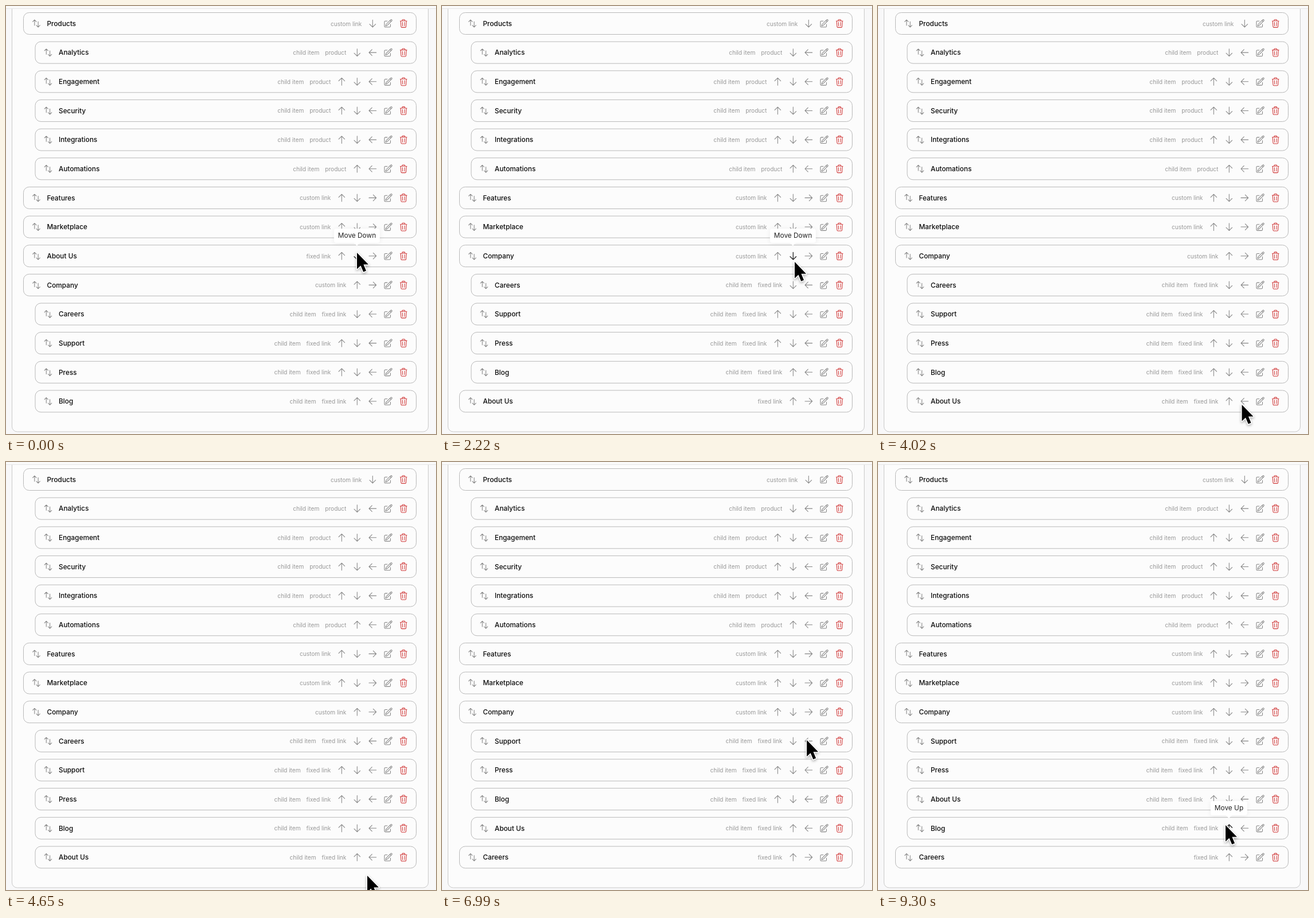
Animation of 751 by 746 pixels, one loop 9420 ms. Source, as an HTML page:

```html
<!DOCTYPE html>
<html lang="en">
<head>
<meta charset="utf-8">
<title>Menu editor</title>
<style>
  html, body { margin: 0; width: 100%; height: 100%; overflow: hidden; background: #f8f8f9; }
  body { position: relative; font-family: Inter, sans-serif; }
  svg { position: absolute; left: 0; top: 0; overflow: visible; }
  .row { fill: #fcfcfc; stroke: #b9b9b9; }
  .name { font-size: 11.85px; font-weight: 500; fill: #0c0c0c; }
  .meta { font-size: 10.12px; fill: #989898; text-anchor: end; }
  .icon { fill: none; stroke: #858585; stroke-width: 1.5; stroke-linecap: round; stroke-linejoin: round; }
  .icon.hot { stroke: #2a2a2a; stroke-width: 1.9; }
  .icon.trash { stroke: #d03a3a; }
  #tip {
    position: absolute; height: 25px; padding: 0 7px; border-radius: 4px; background: #fff;
    font-size: 11.85px; line-height: 25px; color: #222; white-space: nowrap;
    transform: translateX(-50%); box-shadow: 0 1px 9px rgba(0, 0, 0, .07);
  }
  #tip::after {
    content: ""; position: absolute; left: 50%; top: 100%; margin-left: -5px;
    border: 5px solid transparent; border-top-color: #fff; border-bottom: 0;
  }
  #cursor { filter: drop-shadow(0 2px 2px rgba(0, 0, 0, .3)); }
</style>
</head>
<body>
<svg width="751" height="746">
  <rect x="10.5" y="-20" width="727" height="762" rx="9" fill="#fcfcfc" stroke="#c9c9c9"/>
  <rect width="751" height="4" fill="#fafafa"/>
  <path d="M0 4.5H751" stroke="#e6e6e6"/>
  <g id="list"></g>
</svg>
<div id="tip"></div>
<svg id="cursor" width="24" height="40">
  <path d="M0 0V28.5L6.5 22.4 11.2 33.6 16 31.6 11.4 20.6H20Z" fill="#000" stroke="#fff"
    stroke-width="3" stroke-linejoin="round" paint-order="stroke"/>
</svg>
<script>
const LOOP = 9420, TOP = 30.5, STEP = 50.65, GAP = 27;

const kinds = {
  Products: 'custom link', Features: 'custom link', Marketplace: 'custom link', Company: 'custom link',
  Analytics: 'product', Engagement: 'product', Security: 'product', Integrations: 'product', Automations: 'product'
};
const head = 'Products,>Analytics,>Engagement,>Security,>Integrations,>Automations,Features,Marketplace,';

// [start, rows after the fixed head]; ">" marks a child
const orders = [
  [0, 'About Us,Company,>Careers,>Support,>Press,>Blog'],
  [1590, 'Company,>Careers,>Support,>Press,>Blog,About Us'],
  [3600, 'Company,>Careers,>Support,>Press,>Blog,>About Us'],
  [6630, 'Company,>Support,>Press,>Blog,>About Us,Careers'],
  [8640, 'Company,>Support,>Press,>About Us,>Blog,Careers']
];

// [from, to, row, x, tooltip]
const hovers = [
  [0, 2280, 8, 613, 'Move Down'],
  [3380, 3780, 13, 640, ''],
  [5560, 5900, 10, 613, 'Move Down'],
  [6080, 6990, 9, 640, ''],
  [8340, LOOP, 12, 613, 'Move Up']
];

// [time, x, y]
const path = [
  [0, 613, 430], [1590, 613, 430], [2220, 616, 446], [2490, 628, 711], [2730, 628, 711],
  [3210, 630, 701], [3450, 637, 688], [3720, 637, 688], [4650, 631, 721], [4740, 631, 722],
  [4950, 631, 722], [5600, 614, 538], [5850, 634, 511], [6300, 638, 484], [6900, 638, 484],
  [7890, 601, 543], [8430, 607, 633], [LOOP, 607, 633]
];

const arrow = 'M4.5 10.5 12 3l7.5 7.5M12 3v18';
const shapes = {
  sort: 'M3 7.5 7.5 3 12 7.5M7.5 3v13.5M21 16.5 16.5 21 12 16.5M16.5 21V7.5',
  edit: 'm16.86 4.49 1.69-1.69a1.875 1.875 0 1 1 2.65 2.65L10.58 16.07a4.5 4.5 0 0 1-1.9 1.13L6 18' +
    'l.8-2.69a4.5 4.5 0 0 1 1.13-1.89ZL19.5 7.13M18 14v4.75A2.25 2.25 0 0 1 15.75 21H5.25' +
    'A2.25 2.25 0 0 1 3 18.75V8.25A2.25 2.25 0 0 1 5.25 6H10',
  trash: 'M3.75 5.9Q12 4.6 20.25 5.9M4.8 5.8 5.84 19.7a2.25 2.25 0 0 0 2.24 2.05h7.84' +
    'a2.25 2.25 0 0 0 2.24-2.05L19.2 5.8M8.25 5.4v-.9a2.2 2.2 0 0 1 2.1-2.2h3.3' +
    'a2.2 2.2 0 0 1 2.1 2.2v.9M9.26 9l.35 9M14.74 9l-.35 9'
};
const turns = { up: 0, right: 90, down: 180, left: 270 };

const list = document.getElementById('list');
const tip = document.getElementById('tip');
const cursor = document.getElementById('cursor');

function icon(kind, x, y, hot) {
  const cls = `icon ${kind}${hot ? ' hot' : ''}`;
  return `<path class="${cls}" d="${shapes[kind] || arrow}" transform="translate(${x} ${y})
    scale(.703) rotate(${turns[kind] || 0}) translate(-12 -12)"/>`;
}

function drawRow(rows, i, hover) {
  const child = rows[i][0] === '>';
  const name = rows[i].replace('>', '');
  const kind = kinds[name] || 'fixed link';
  const isTop = r => r[0] !== '>';
  const first = child ? isTop(rows[i - 1]) : !rows.slice(0, i).some(isTop);
  const last = child ? !rows[i + 1] || isTop(rows[i + 1]) : !rows.slice(i + 1).some(isTop);

  const tools = [];
  if (!first) tools.push('up');
  if (!last) tools.push('down');
  if (child) tools.push('left');
  else if (!first) tools.push('right');
  tools.push('edit', 'trash');

  const y = TOP + i * STEP, left = child ? 51 : 30.5;
  const start = 694.3 - (tools.length - 1) * GAP;
  const icons = tools.map((tool, n) => {
    const x = start + n * GAP;
    return icon(tool, x, y, hover && hover[2] === i && Math.abs(hover[3] - x) < 5);
  });
  const meta = child ? `child item<tspan dx="10">${kind}</tspan>` : kind;
  return `<rect class="row" x="${left}" y="${y - 19}" width="${716.5 - left}" height="38" rx="10"/>
    ${icon('sort', left + 22.5, y)}
    <text class="name" x="${left + 41}" y="${y + 4.2}">${name}</text>
    <text class="meta" x="${start - 18.9}" y="${y + 4}">${meta}</text>${icons.join('')}`;
}

// Tangent of a monotone curve through the path points
function slope(i, k) {
  if (!path[i - 1] || !path[i + 1]) return 0;
  const rate = n => (path[n + 1][k] - path[n][k]) / (path[n + 1][0] - path[n][0]);
  const a = rate(i - 1), b = rate(i);
  return a * b > 0 ? 2 * a * b / (a + b) : 0;
}

function cursorAt(t) {
  const i = path.findIndex((p, n) => t < path[n + 1][0]);
  const a = path[i], b = path[i + 1], span = b[0] - a[0], u = (t - a[0]) / span;
  return [1, 2].map(k => {
    const ease = u * u * (3 - 2 * u);
    return a[k] + (b[k] - a[k]) * ease
      + span * u * (1 - u) * ((1 - u) * slope(i, k) - u * slope(i + 1, k));
  });
}

let shown = '';
function draw(t) {
  const order = orders.filter(o => o[0] <= t).pop();
  const hover = hovers.find(h => t >= h[0] && t < h[1]);
  const key = order[0] + '/' + (hover ? hover[0] : '');
  if (key !== shown) {
    shown = key;
    const rows = (head + order[1]).split(',');
    list.innerHTML = rows.map((r, i) => drawRow(rows, i, hover)).join('');
    tip.hidden = !hover || !hover[4];
    if (!tip.hidden) {
      tip.textContent = hover[4];
      tip.style.left = hover[3] + 'px';
      tip.style.top = TOP + hover[2] * STEP - 47.5 + 'px';
    }
  }
  const [x, y] = cursorAt(t);
  cursor.style.transform = `translate(${x}px, ${y}px)`;
}

const begin = performance.now();
function tick() {
  draw((performance.now() - begin) % LOOP);
  requestAnimationFrame(tick);
}
tick();
</script>
</body>
</html>
```
